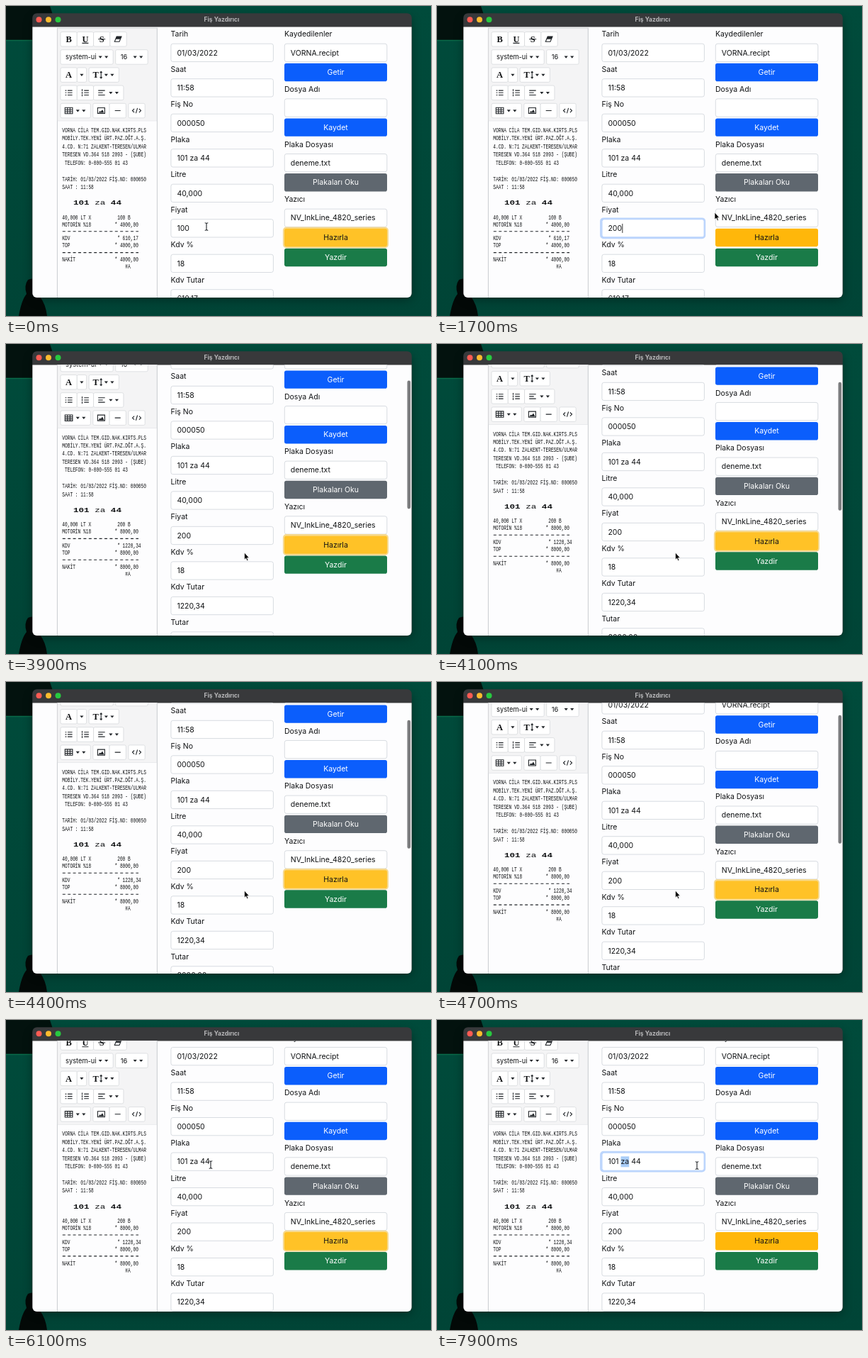
An HTML page for the animation above (8 s loop, 600 px wide and 437 px high).

```html
<!DOCTYPE html>
<html lang="tr">
<head>
<meta charset="utf-8">
<title>Fiş Yazdırıcı</title>
<style>
html, body { margin: 0; width: 100%; height: 100%; overflow: hidden; background: #004a3a; }
svg { display: block; width: 600px; height: 437px; }
text { font: 10.5px Inter, "Open Sans", sans-serif; fill: #101214; white-space: pre; }
.mid { text-anchor: middle; }
.light { fill: #fff; }
.title { font-size: 8.5px; font-weight: 700; fill: #b9b9bb; }
.tool { font-size: 9.3px; }
.glyph { font: bold 12.5px "Liberation Serif", "Noto Serif", serif; }
.mono { font: 9px "Liberation Mono", monospace; }
.bold { font-weight: bold; }
.field { fill: #fff; stroke: #ced4da; stroke-width: .8; }
.focus { stroke: #86b7fe; }
.key { fill: #fff; stroke: #d3d6d9; stroke-width: .7; }
.line { fill: none; stroke: #212529; stroke-width: 1.1; }
.solid { fill: #212529; }
.ring { fill: none; stroke-width: 2.6; }
</style>
</head>
<body>
<svg viewBox="0 0 600 437">
  <defs>
    <linearGradient id="wall" x2="0" y2="1">
      <stop offset="0" stop-color="#004b3b"/><stop offset="1" stop-color="#004436"/>
    </linearGradient>
    <clipPath id="page"><path d="M37.4 29.4H572.6V405a6 6 0 0 1-6 6H43.4a6 6 0 0 1-6-6Z"/></clipPath>
    <filter id="soft" x="-20%" y="-20%" width="140%" height="140%"><feGaussianBlur stdDeviation="7"/></filter>
  </defs>
  <rect width="600" height="437" fill="url(#wall)"/>
  <path d="M0 0H62Q71 24 71 48H0Z" fill="#03120e"/>
  <path d="M0 48.5H71" stroke="#0a6a48" stroke-width="1.5"/>
  <path d="M18 437Q22 414 29 406Q25 394 31 386Q41 381 45 392Q43 404 48 410Q56 420 58 437Z" fill="#030907"/>
  <rect x="37" y="16" width="536" height="398" rx="8" opacity=".35" filter="url(#soft)"/>
  <rect x="37.2" y="10.2" width="535.6" height="401" rx="6.5" fill="#38393b"/>
  <circle cx="46.5" cy="19.3" r="4" fill="#fd5b53"/>
  <circle cx="60" cy="19.3" r="4" fill="#fdbb2e"/>
  <circle cx="73.5" cy="19.3" r="4" fill="#28c840"/>
  <text class="title mid" x="304.5" y="22.3">Fiş Yazdırıcı</text>
  <g clip-path="url(#page)">
    <rect x="37" y="29" width="536" height="383" fill="#fdfdfe"/>
    <g id="content"></g>
    <rect id="thumb" x="566.5" width="4.6" height="181" rx="2.3" fill="#7b7c7e"/>
  </g>
  <g id="cursor">
    <path id="beam" d="M-2.3-5.3Q0-5.3 0-3.8Q0-5.3 2.3-5.3M0-4V4M-2.3 5.3Q0 5.3 0 3.8Q0 5.3 2.3 5.3" class="line"/>
    <path id="arrow" d="M0-5V5L2.2 3 3.8 6.6 5.4 5.9 3.9 2.4H6.8Z" stroke="#fff" stroke-width=".7"/>
    <path id="hand" d="M-1-5.5Q0-6.3.8-5.5V-1.5L4.2-.5Q5.2 0 4.9 1.4L4 5.5H-1.2L-4 1.5Q-3.6.2-2.3 1L-1 2Z" fill="#fff" stroke="#111" stroke-width=".8"/>
  </g>
</svg>
<script>
const $ = id => document.getElementById(id);
const content = $("content");

function add(tag, attrs, text = "") {
  const node = document.createElementNS("http://www.w3.org/2000/svg", tag);
  for (const name in attrs) node.setAttribute(name, attrs[name]);
  node.textContent = text;
  return content.appendChild(node);
}
const label = (x, y, text, cls = "") => add("text", { x, y, class: cls }, text);
const box = (x, y, width, height, attrs) => add("rect", { x, y, width, height, rx: 2.8, ...attrs });

// Editor: a key is as wide as its face plus padding, and wider with a menu mark
box(72.4, 31.3, 141, 500, { fill: "#fdfdfe", stroke: "#c9ccd0", rx: 0 });
box(72.9, 31.8, 140, 130.2, { fill: "#f4f4f5", stroke: "#dcdee1", "stroke-width": .5, rx: 0 });

const bars = (x, width) => [-3.2, 0, 3.2].map(y => `M${x} ${y}h${width}`).join("");
const icons = {
  eraser: { solid: "M-2.3-3.7H4.5L3 0H-3.8Z", line: "M-2.3-3.7H4.5L1.5 3.5H-5.2Z" },
  ul: { line: bars(-5, 1.8) + bars(-1.6, 6.6) },
  ol: { line: "M-4.4-5v2.8M-4.4-1.4v2.8M-4.4 2.2v2.8" + bars(-1.6, 6.6) },
  align: { line: "M-5-3.2H4.5M-5 0H1.5M-5 3.2H4.5" },
  table: { line: "M-5.3-4.2H5.3V4.2H-5.3ZM-5.3-1.3H5.3M-5.3 1.5H5.3M-1.8-4.2V4.2M1.8-4.2V4.2" },
  image: { solid: "M-4 3L-1.8.4-.6 1.4 1.6-1.6 4 3Z", line: "M-5-4H5V4H-5Z" },
  rule: { line: "M-4 0H4" },
  code: { line: "M-3.4-2.6L-6 0-3.4 2.6M3.4-2.6L6 0 3.4 2.6M1.1-3.6L-1.1 3.6" },
  U: { line: "M-4.5 5.7h9" },
  S: { line: "M-5 0h10" },
  T: { line: "M5.5-4.5v9M4-3L5.5-4.8 7-3M4 3L5.5 4.8 7 3" }
};
const mark = (x, y) => add("path", { d: `M${x - 2.6} ${y - 1.3}h5.2l-2.6 3.2z`, class: "solid" });

function key(x, y, face, menu) {
  const isWord = face.length > 1 && !icons[face];
  const faceWidth = !face ? 0 : isWord ? face.length * 4.1 + 5 : 10;
  const width = faceWidth + 13.3 + (menu ? 19 : 0);
  const middle = x + 6.6 + faceWidth / 2;
  box(x, y - 10.2, width, 20.5, { class: "key", rx: 2 });
  if (isWord) label(x + 7, y + 3.4, face, "tool");
  if (face.length === 1) label(middle - (face === "T" ? 2 : 0), y + 4.2, face, "glyph mid");
  for (const cls in icons[face])
    add("path", { d: icons[face][cls], class: cls, transform: `translate(${middle} ${y})` });
  if (!face) mark(middle, y);
  if (menu) [18, 9.5].forEach(inset => mark(x + width - inset, y));
  return width;
}

["B,U,S,eraser", "system-ui+ 16+", "A, T+", "ul,ol,align+", "table+ image,rule code"].forEach((row, i) => {
  let x = 77;
  for (const group of row.split(" ")) {
    for (const name of group.split(","))
      x += key(x, 46.7 + 25.2 * i, name.replace("+", ""), name.endsWith("+"));
    x += 3.5;
  }
});

// Receipt: condensed print, with one expanded line
const print = (x, y, text, wide = .687, cls = "") =>
  add("text", { class: "mono " + cls, transform: `translate(${x} ${y}) scale(${wide} 1)` }, text);

["VORNA CİLA TEM.GID.NAK.KIRTS.PLS", "MOBİLY.TEK.YENİ ÜRT.PAZ.DĞT.A.Ş.",
 "4.CD. N:71 ZALKENT-TERESEN/ULMAR", "TERESEN VD.364 518 2093 - (ŞUBE)",
 " TELEFON: 0-000-555 01 43", "", "TARİH: 01/03/2022 FİŞ.NO: 000050", "SAAT : 11:58"
].forEach((text, i) => print(79.3, 177.9 + 11.45 * i, text));

const plateNumber = "101 za 44";
plateNumber.split(" ").forEach(part =>
  print(95 + 7.55 * plateNumber.indexOf(part), 280.3, part, 1.4, part === "za" ? "" : "bold"));

const receiptLines = (price, total, tax) => [
  "40,000 LT X".padEnd(21) + price + " B",
  "MOTORİN %18".padEnd(20) + "* " + total,
  "",
  "KDV".padEnd(21) + "* " + tax,
  "TOP".padEnd(20) + "* " + total,
  "",
  "NAKİT".padEnd(20) + "* " + total,
  "#A".padStart(26)
];
const lineY = i => 300.6 + 9.96 * i;
const receipt = receiptLines("", "", "").map((_, i) => print(79.3, lineY(i), ""));
for (const i of [2, 5])
  add("path", { d: `M79.8 ${lineY(i) - 2.8}H187`, class: "line", "stroke-dasharray": "4 3.4" });

// Form columns
const targets = [];
const fields = {};

function ring(x, y, stroke) {
  return box(x - 1, y - 1, 146.5, 27.2, { class: "ring", stroke, rx: 3.6 });
}
function field(x, y, name, value) {
  label(x, y - 9.9, name);
  const frame = box(x + .3, y, 144.5, 25.3, { class: "field" });
  targets.push({ x, y, shape: "beam" });
  fields[name] = { y, frame, text: label(x + 8.8, y + 16.3, value) };
}
function button(y, text, fill, cls = "light") {
  const face = box(393, y, 145, 25.4, { fill });
  label(465.5, y + 16.2, text, "mid " + cls);
  targets.push({ x: 393, y, shape: "hand" });
  return face;
}

Object.entries({
  "Tarih": "01/03/2022", "Saat": "11:58", "Fiş No": "000050", "Plaka": plateNumber, "Litre": "40,000",
  "Fiyat": "100", "Kdv %": "18", "Kdv Tutar": "", "Tutar": ""
}).forEach(([name, value], i) => field(232.6, 53.2 + 49.5 * i, name, value));

[["Kaydedilenler", "VORNA.recipt", "Getir", "#0b5efc"],
 ["Dosya Adı", "", "Kaydet", "#0b5efc"],
 ["Plaka Dosyası", "deneme.txt", "Plakaları Oku", "#5f676f"],
 ["Yazıcı", "NV_InkLine_4820_series"]
].forEach(([name, value, action, fill], i) => {
  const y = 53.2 + 77.65 * i;
  field(393, y, name, value);
  if (action) button(y + 27.6, action, fill);
});
const prepareY = fields["Yazıcı"].y + 27.6;
const prepareRing = ring(393.2, prepareY, "#f6d98f");
const prepare = button(prepareY, "Hazırla", "#ffb70a", "");
button(prepareY + 28, "Yazdir", "#1a7b48");

const { Fiyat: price, Plaka: plate } = fields;
for (const f of [price, plate]) f.ring = ring(232.4, f.y, "#bcd5fc");
const insertion = box(0, price.y + 6.2, .8, 13, { rx: 0 });
const selection = box(0, plate.y + 5.3, 0, 15, { fill: "#a9cdf8", rx: 0 });
content.insertBefore(selection, plate.text);

// Motion: each move eases from wherever the last one ended
const pointerMoves = [
  { from: 100, to: 700, end: [246, 314] },
  { from: 1300, to: 1700, end: [392, 296] },
  { from: 1700, to: 2300, end: [440, 327] },
  { from: 2600, to: 3200, end: [330, 307] },
  { from: 3400, to: 3600, end: [336.5, 299] },
  { from: 5300, to: 6100, end: [289, 204] },
  { from: 6200, to: 6500, end: [267, 201] },
  { from: 7000, to: 7500, end: [367, 205] }
];
const scrollMoves = [{ from: 3500, to: 4000, end: [48.4] }, { from: 4400, to: 5050, end: [14.7] }];

const clamp = k => Math.max(0, Math.min(1, k));
const ease = k => k * k * (3 - 2 * k);
const travel = (start, moves, t) => moves.reduce((place, { from, to, end }) => {
  const k = ease(clamp((t - from) / (to - from)));
  return place.map((v, i) => v + (end[i] - v) * k);
}, start);
const show = (node, on) => { node.style.display = on ? "" : "none"; };

function setFocus(f, on) {
  show(f.ring, on);
  f.frame.classList.toggle("focus", on);
}

function render(time) {
  const t = Math.floor(time % 8000 / 100) * 100;
  const [scroll] = travel([0], scrollMoves, t);
  const [x, y] = travel([283, 311], pointerMoves, t);
  content.setAttribute("transform", `translate(0 ${-scroll})`);
  $("thumb").setAttribute("y", 31 + scroll * .47);
  $("thumb").style.opacity = t < 3500 ? 0 : clamp((5900 - t) / 300);

  const priceFocus = t >= 600 && t < 2400;
  const plateFocus = t >= 6400;
  const prepareFocus = !priceFocus && !plateFocus;
  setFocus(price, priceFocus);
  setFocus(plate, plateFocus);
  show(prepareRing, prepareFocus);
  prepare.setAttribute("fill", prepareFocus ? "#ffc227" : "#ffb70a");

  const typing = t >= 900;
  price.text.textContent = typing ? "200".slice(0, Math.ceil((t - 800) / 200)) : "100";
  show(insertion, priceFocus && typing);
  insertion.setAttribute("x", 241.8 + price.text.getComputedTextLength());

  const word = plateNumber.indexOf("za");
  show(selection, t >= 6700);
  selection.setAttribute("x", plate.text.getStartPositionOfChar(word).x);
  selection.setAttribute("width", plate.text.getSubStringLength(word, 2));

  const [unit, total, tax] = t >= 2500 ? ["200", "8000,00", "1220,34"] : ["100", "4000,00", "610,17"];
  receiptLines(unit, total, tax).forEach((text, i) => { receipt[i].textContent = text; });
  fields["Kdv Tutar"].text.textContent = tax;
  fields.Tutar.text.textContent = total;

  const pageY = y + scroll;
  const under = targets.find(r => x >= r.x && x <= r.x + 145 && pageY >= r.y && pageY <= r.y + 25.4);
  const shape = under ? under.shape : "arrow";
  for (const id of ["beam", "arrow", "hand"]) show($(id), id === shape);
  $("cursor").setAttribute("transform", `translate(${x} ${y})`);
}

function tick() {
  render(performance.now());
  requestAnimationFrame(tick);
}
tick();
</script>
</body>
</html>
```
